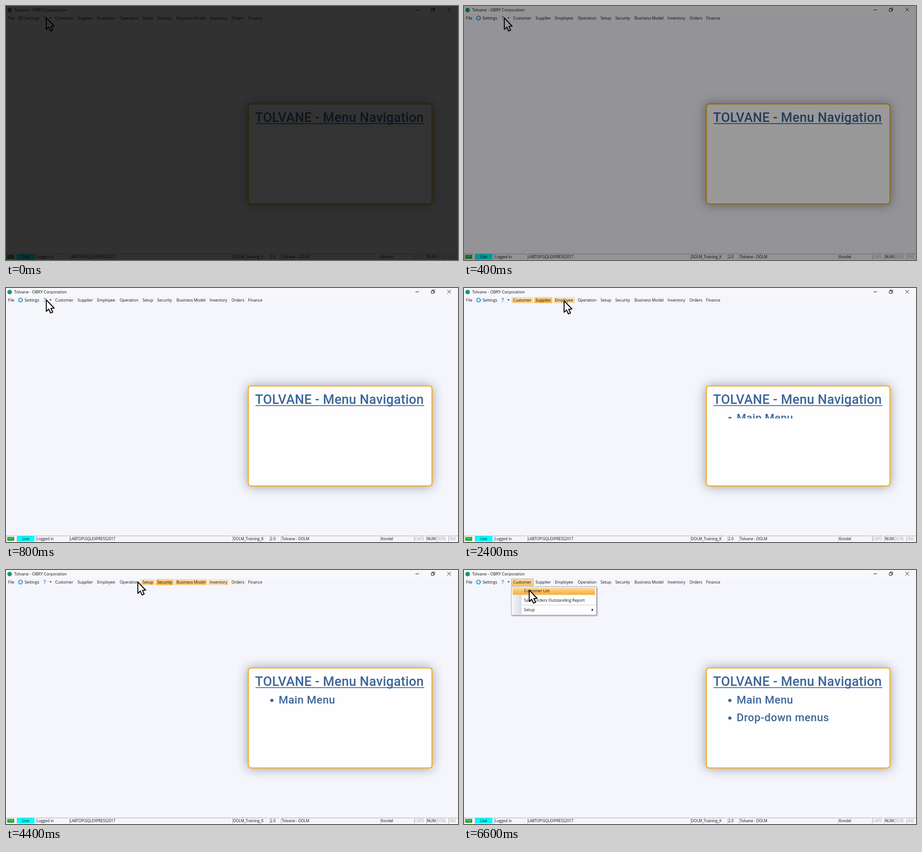
An HTML page that plays this animation: 998 by 561 pixels, repeating every 8 s.

```html
<!DOCTYPE html>
<html lang="en">
<head>
<meta charset="utf-8">
<title>Menu navigation</title>
<style>
  html, body { margin: 0; width: 100%; height: 100%; overflow: hidden; background: #000; }
  svg { display: block; width: 998px; height: 561px; }
  text { white-space: pre; }
  .ui { font: 8.75px "Open Sans", "Noto Sans", sans-serif; fill: #111; }
  .bar { font: 8.25px "Open Sans", "Noto Sans", sans-serif; fill: #111; }
  .off { fill: #a3a3a8; }
  .card { font-family: Roboto, Inter, sans-serif; font-weight: 500; fill: #3d6699; }
  .item { font-size: 24px; letter-spacing: .55px; }
  .glyph { fill: none; stroke: #151515; stroke-width: 1; }
</style>
</head>
<body>
<svg viewBox="0 0 998 561">
  <defs>
    <linearGradient id="hot" x2="0" y2="1">
      <stop stop-color="#fdd48c"/><stop offset=".45" stop-color="#fbbf57"/><stop offset="1" stop-color="#f8b23c"/>
    </linearGradient>
    <linearGradient id="open" x2="0" y2="1">
      <stop stop-color="#fddca4"/><stop offset="1" stop-color="#fbc066"/>
    </linearGradient>
    <linearGradient id="row" x2="0" y2="1">
      <stop stop-color="#fedfa8"/><stop offset=".5" stop-color="#fbc364"/><stop offset="1" stop-color="#f7ad38"/>
    </linearGradient>
    <linearGradient id="gutter">
      <stop stop-color="#f6f6fc"/><stop offset="1" stop-color="#d9dae8"/>
    </linearGradient>
    <filter id="soft" x="-20%" y="-25%" width="140%" height="150%"><feGaussianBlur stdDeviation="12"/></filter>
    <filter id="drop" x="-10%" y="-20%" width="120%" height="150%"><feGaussianBlur stdDeviation="1.3"/></filter>
    <clipPath id="wipe0"><rect x="570" y="271" width="300" height="34"/></clipPath>
    <clipPath id="wipe1"><rect x="570" y="310" width="300" height="34"/></clipPath>
  </defs>

  <rect width="998" height="561" fill="#f5f5fc"/>
  <rect width="998" height="17" fill="#f8f8fc"/>

  <!-- title bar -->
  <circle cx="8" cy="9" r="5" fill="#159a6c"/>
  <text class="ui" x="18" y="12.3" style="font-size:9px">Tolvane - OBRY Corporation</text>
  <path class="glyph" d="M904 8.5h8M939 6.5h5.5v5.5h-5.5zM940.8 6.2V4.5h5.7v5.7h-1.7M974.5 4.2l8 8m0-8l-8 8"/>

  <!-- menu bar -->
  <g id="glows"></g>
  <g id="menus"></g>
  <circle cx="32" cy="26.7" r="3.9" fill="none" stroke="#cfe6f5" stroke-width="3.4"/>
  <circle cx="32" cy="26.7" r="4.1" fill="none" stroke="#3592c9" stroke-width="2.6" stroke-dasharray="2 .9"/>
  <text x="82.8" y="31" font-family="Open Sans, sans-serif" font-weight="700" font-size="11.5" fill="#4d92dc">?</text>
  <path d="M95.8 25h5l-2.5 2.7z" fill="#222"/>

  <!-- card -->
  <rect x="533" y="215.5" width="409" height="224" rx="9" fill="#596170" opacity=".58" filter="url(#soft)"/>
  <rect x="535" y="216.2" width="405.7" height="221" rx="6" fill="#fefefe" stroke="#f4b02c" stroke-width="2.6"/>
  <g class="card">
    <text x="550" y="255.7" font-size="28.8" letter-spacing=".28">TOLVANE - Menu Navigation</text>
    <rect x="551" y="258.8" width="372.5" height="1.8"/>
    <g clip-path="url(#wipe0)">
      <circle cx="587" cy="288" r="3.6"/>
      <text class="item" x="602" y="295">Main Menu</text>
    </g>
    <g clip-path="url(#wipe1)">
      <circle cx="587" cy="327" r="3.6"/>
      <text class="item" x="602" y="333.7">Drop-down menus</text>
    </g>
  </g>

  <!-- status bar -->
  <rect y="546" width="998" height="15" fill="#f4f4f9"/>
  <g id="panels"></g>
  <rect x="3.5" y="550.5" width="14" height="7" fill="#12c21c" stroke="#0b7d16"/>
  <path d="M5 552.5h11" stroke="#6fea6f"/>

  <!-- drop-down -->
  <g id="drop-menu">
    <rect x="107" y="39" width="188" height="63" fill="#444" opacity=".4" filter="url(#drop)"/>
    <rect x="104.5" y="36.5" width="188" height="63" fill="#fdfdff" stroke="#9a9cae"/>
    <rect x="106" y="38" width="21" height="60" fill="url(#gutter)"/>
    <path d="M129 77.5h162" stroke="#c9cad6"/>
    <rect x="104.5" y="19.5" width="48.5" height="15" fill="url(#open)" stroke="#b9a78c" stroke-width=".8"/>
    <text class="ui" x="108.5" y="29.8">Customer</text>
    <rect id="row-hot" x="107.5" y="38.5" width="182" height="16.5" fill="url(#row)" stroke="#f6dfb4" stroke-width=".9"/>
    <g class="ui">
      <text x="132.5" y="49.2">Customer List</text>
      <text x="132.5" y="70.2">Sales Orders Outstanding Report</text>
      <text x="132.5" y="91.2">Setup</text>
    </g>
    <path d="M282 85v6l3.6-3z" fill="#111"/>
  </g>

  <path id="cursor" d="M1 1.2V26.6L6.4 21.6L10.4 30.2L15 28.3L11.2 20.1L18.2 19.4Z"
        fill="#fff" stroke="#151515" stroke-width="2.3" stroke-linejoin="round"/>
  <rect id="shade" width="998" height="561"/>
</svg>

<script>
const LOOP = 8000, STEP = 200;
const $ = id => document.getElementById(id);
const clamp = v => Math.min(1, Math.max(0, v));
const ease = u => u * u * (3 - 2 * u);
const part = (t, from, to) => clamp((t - from) / (to - from));

function add(parent, tag, attrs, text = '') {
  const el = document.createElementNS('http://www.w3.org/2000/svg', tag);
  for (const key in attrs) el.setAttribute(key, attrs[key]);
  el.textContent = text;
  return parent.appendChild(el);
}

// label, text x, text end
const menus = [
  ['Customer', 108.5, 149], ['Supplier', 158, 192], ['Employee', 201, 242],
  ['Operation', 251, 293], ['Setup', 301.5, 325], ['Security', 334, 367.5],
  ['Business Model', 376.5, 441], ['Inventory', 449.5, 489],
  ['Orders', 498, 526], ['Finance', 534.5, 567]
].map(([label, x, end]) => {
  add($('menus'), 'text', { class: 'ui', x, y: 29.8 }, label);
  return {
    left: x - 3, right: end + 3,
    glow: add($('glows'), 'rect', { x: x - 3, y: 20, width: end - x + 6, height: 13.3, fill: 'url(#hot)' })
  };
});
add($('menus'), 'text', { class: 'ui', x: 4.5, y: 29.8 }, 'File');
add($('menus'), 'text', { class: 'ui', x: 41, y: 29.8 }, 'Settings');

// panel left, right, label, text x, dimmed, fill
[
  [0, 21, '', 0], [24, 64, 'Live', 36, 0, '#00ffff'], [66, 138, 'Logged in', 68],
  [140, 498, 'LABTOP\\SQLEXPRESS2017', 141], [500, 579, 'DOLM_Training_K', 501.5],
  [582, 605, '2.0', 583.5], [607, 824, 'Tolvane - DOLM', 609], [826, 899, 'Kondel', 828],
  [901, 925, 'CAPS', 903, 1], [928, 949, 'NUM', 929.5], [951, 975, 'SCRL', 953, 1], [977, 998, 'INS', 980, 1]
].forEach(([left, right, label, x, dim, fill = 'none']) => {
  const box = $('panels');
  add(box, 'rect', { x: left, y: 547, width: right - left, height: 13.5, fill });
  add(box, 'path', { d: `M${left + .5} 560V547.5H${right}`, fill: 'none', stroke: '#a9a9b2' });
  add(box, 'path', { d: `M${left} 560.5H${right - .5}V548`, fill: 'none', stroke: '#fff' });
  add(box, 'text', { class: dim ? 'bar off' : 'bar', x, y: 557.2 }, label);
});

function pointer(t) {
  const out = ease(part(t, 1800, 3500));
  const back = ease(part(t, 3700, 4890));
  const down = ease(part(t, 6050, 6600));
  return {
    x: 88 + 462 * out - 412 * back + 5 * down,
    y: 25 + 2 * Math.sin(Math.PI * clamp(out * 1.6)) + 18 * down
  };
}

// Items light up quickly and fade slowly, a little behind the pointer; replayed up to t.
function glowLevels(t) {
  const dt = 10, lag = 20, state = menus.map(() => ({ level: 0, rising: false }));
  for (let s = 0; s <= t; s += dt) {
    const { x } = pointer(s - lag);
    menus.forEach((m, i) => {
      const g = state[i], over = x >= m.left && x < m.right;
      if (over) g.rising = true;
      g.level = clamp(g.level + (g.rising ? dt / 100 : -dt / 450));
      if (g.level === 1 && !over) g.rising = false;
    });
  }
  return state.map(g => g.level);
}

function draw(t) {
  const p = pointer(t);
  $('cursor').setAttribute('transform', `translate(${p.x} ${p.y})`);
  $('shade').setAttribute('opacity', .8 * (1 - part(t, 0, 800)));
  glowLevels(t).forEach((level, i) => menus[i].glow.setAttribute('opacity', level));
  [2000, 4880].forEach((start, i) =>
    $('wipe' + i).firstElementChild.setAttribute('height', 34 * part(t, start, start + 800)));
  $('drop-menu').style.display = t >= 5700 ? '' : 'none';
  $('row-hot').style.display = p.y > 36 ? '' : 'none';
}

let last = -1;
function tick() {
  const t = Math.floor(performance.now() % LOOP / STEP) * STEP;
  if (t !== last) draw(last = t);
  requestAnimationFrame(tick);
}
tick();
</script>
</body>
</html>
```
